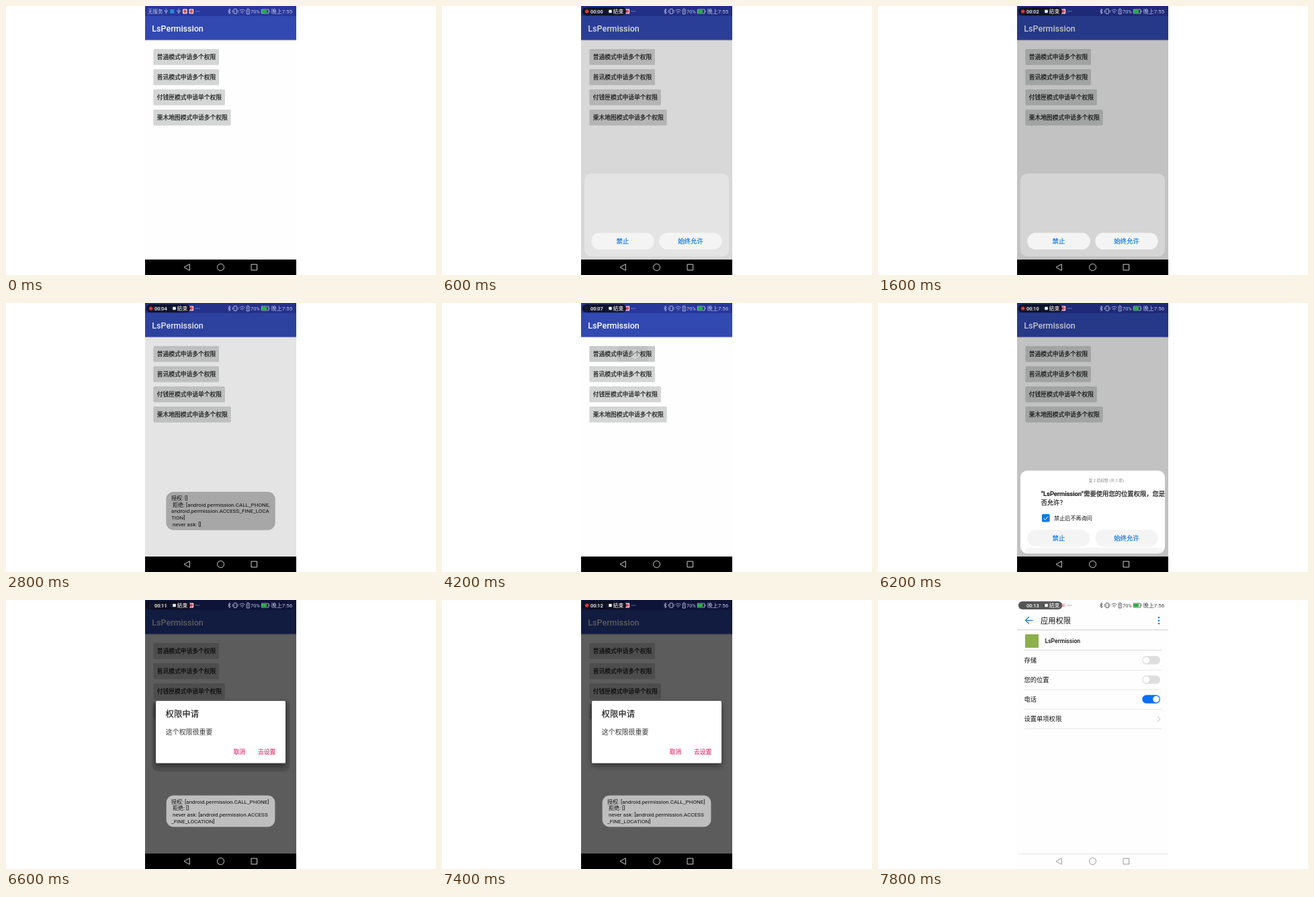
Recreate the animation shown at these times as an HTML page. Size 640 by 400 pixels, loop 8000 ms.

```html
<!DOCTYPE html>
<html lang="zh-CN">
<head>
<meta charset="utf-8">
<title>LsPermission</title>
<style>
  html, body { margin: 0; width: 100%; height: 100%; overflow: hidden; background: #fff; }
  svg { display: block; width: 640px; height: 400px; }
  text { font-family: Roboto, "Noto Sans CJK SC", "Noto Sans CJK", sans-serif; white-space: pre; }
  .medium { font-weight: 500; }
  /* The CJK font has no medium weight, so a hairline thickens it */
  .sturdy { stroke-width: 0.22; }
  .line { fill: none; stroke: currentColor; }
</style>
</head>
<body>
<svg viewBox="0 0 640 400">
  <defs>
    <filter id="soft" x="-10%" y="-20%" width="120%" height="150%">
      <feDropShadow dx="0" dy="0.5" stdDeviation="0.7" flood-opacity="0.22"/>
    </filter>
    <filter id="deep" x="-10%" y="-20%" width="120%" height="150%">
      <feDropShadow dx="0" dy="4" stdDeviation="4" flood-opacity="0.45"/>
    </filter>
    <clipPath id="firstButton"><rect x="219.5" y="64" width="97.5" height="23" rx="1.5"/></clipPath>
    <clipPath id="screen"><rect x="207" width="225" height="400"/></clipPath>
  </defs>

  <g clip-path="url(#screen)">
    <g id="home">
      <rect x="207" width="225" height="378" fill="#fefefe"/>
      <rect x="207" y="10" width="225" height="40.5" fill="#3249b1" filter="url(#soft)"/>
      <rect x="207" width="225" height="15" fill="#27379b"/>
      <text class="medium" x="217.3" y="38" font-size="12.5" fill="#fff">LsPermission</text>
      <g id="buttons"></g>
      <g id="press" clip-path="url(#firstButton)">
        <rect x="219" y="63" width="99" height="25" fill-opacity="0.05"/>
        <circle id="ripple" cx="284" cy="76" r="24" fill-opacity="0.05"/>
        <circle cx="287" cy="76" r="7" fill="#eee" fill-opacity="0.35"/>
      </g>
    </g>
    <rect id="dim" x="207" width="225" height="378"/>

    <g id="panel">
      <rect id="panelBack" x="212" y="249.2" width="215" height="123.3" rx="10" fill="#fff"/>
      <g id="panelBody">
        <text id="counter" x="339.7" y="266" font-size="5.8" text-anchor="middle" fill="#888"></text>
        <g class="medium sturdy" font-size="9.3" fill="#111" stroke="#111">
          <text id="question" x="242.5" y="287.3"></text>
          <text x="242.5" y="299.8">否允许？</text>
        </g>
        <g id="never">
          <rect x="244.2" y="314.3" width="11" height="11" rx="1.8" fill="#fff" stroke="#bbb" stroke-width="0.8"/>
          <g id="tick">
            <rect x="244" y="314" width="11.5" height="11.5" rx="1.8" fill="#0b7ae8"/>
            <path d="M246.5 320l2.3 2.4 4.4-5" fill="none" stroke="#fff"/>
          </g>
          <text x="262" y="323" font-size="8.15" fill="#111">禁止后不再询问</text>
          <rect x="219" y="364" width="204" height="8" rx="4" fill="#f5f5f5"/>
        </g>
      </g>
      <g fill="#f4f4f4">
        <rect x="222.3" y="337.3" width="93.5" height="24.7" rx="12.3"/>
        <rect x="323.2" y="337.3" width="93.5" height="24.7" rx="12.3"/>
      </g>
      <g class="sturdy" font-size="9.4" text-anchor="middle" fill="#0f7ae0" stroke="#0f7ae0">
        <text x="269" y="353.3">禁止</text>
        <text x="370" y="353.3">始终允许</text>
      </g>
    </g>

    <rect id="alertHalo" x="218" y="149" width="204" height="106" rx="8" fill-opacity="0.13"/>
    <g id="alert">
      <rect x="223" y="150" width="193" height="92.5" rx="1.5" fill="#fff" filter="url(#deep)"/>
      <text class="sturdy" x="237.6" y="174.4" font-size="12.4" fill="#222" stroke="#222">权限申请</text>
      <text x="237.8" y="199.7" font-size="9.95" fill="#333">这个权限很重要</text>
      <g class="sturdy" font-size="8.75" fill="#e8407a" stroke="#e8407a">
        <text x="338.7" y="229">取消</text>
        <text x="375" y="229">去设置</text>
      </g>
    </g>

    <g id="toast">
      <rect id="toastBack" x="238.5" width="162" rx="11" stroke="#000" stroke-opacity="0.12" stroke-width="0.6"/>
      <g id="toastText" font-size="8.08" fill="#111"></g>
    </g>

    <g id="settings">
      <rect x="207" width="225" height="400" fill="#fefefe"/>
      <g fill="none" stroke="#1677e0" stroke-width="1.2">
        <path d="M230.5 30.3H219.5M224.8 25l-5.4 5.3 5.4 5.3"/>
        <path d="M418 26v0M418 30.5v0M418 35v0" stroke-width="2.5" stroke-linecap="round"/>
      </g>
      <text x="242" y="34.7" font-size="11.25" fill="#111">应用权限</text>
      <path d="M207 44.5h225" stroke="#d0d0d0"/>
      <rect x="219" y="51" width="20" height="20" fill="#8bb04c"/>
      <text class="medium" x="248.5" y="63.7" font-size="8.6" fill="#111">LsPermission</text>
      <g id="rows" font-size="9.3" fill="#111"></g>
      <path d="M416 173l3.8 3.9-3.8 3.9" fill="none" stroke="#bbb"/>
    </g>

    <g id="status" fill="currentColor">
      <text x="211" y="10.7" font-size="7.5">无服务</text>
      <g class="line" stroke-width="0.8">
        <path id="usb" d="M238.3 4v8M236.3 6v2l2 1.6 2-1.6V6"/>
        <use href="#usb" x="18.7"/>
        <path d="M282 8h1.3m1 0h1.3m1 0h1.3"/>
        <path d="M330.3 6l4 4-2 2V4l2 2-4 4"/>
        <path d="M339.2 4.5h4v7h-4zM337.3 6v4M345 6v4"/>
        <path d="M347.5 7q4-3.6 8 0M349 9q2.5-2.3 5 0M350.6 10.6q.9-.8 1.8 0"/>
        <path d="M358.2 5h4v7h-4zM359.5 4h1.4M360.2 6.5v2.6m0 .8v1"/>
        <path d="M380.3 5h10.6v6h-10.6zM392 6.8v2.4"/>
      </g>
      <rect x="381" y="5.7" width="7" height="4.6" fill="#22b53a"/>
      <g id="badges">
        <rect x="244.3" y="5" width="6" height="6" fill="#2488dc"/>
        <g id="badge">
          <rect x="263" y="4.5" width="6.6" height="7" rx="1" fill="#f0dbe2"/>
          <circle cx="266.3" cy="8" r="2.4" fill="#dc4c5c"/>
        </g>
        <use href="#badge" x="9.6"/>
      </g>
      <text x="364" y="10.7" font-size="7.4">70%</text>
      <text id="clock" x="394.8" y="11" font-size="8"></text>
    </g>

    <g id="pill">
      <rect id="pillBack" x="208.8" y="2" width="65.5" height="12" rx="6" fill-opacity="0.88"/>
      <circle id="recordDot" cx="215.7" cy="8" r="2.6" fill="#f2362e"/>
      <rect x="248.3" y="5.8" width="4.4" height="4.4" fill="#fff"/>
      <g fill="#fff">
        <text class="medium" id="timer" x="221" y="10.7" font-size="7.4"></text>
        <text x="254.8" y="10.8" font-size="7.7">結束</text>
      </g>
    </g>

    <g id="nav">
      <rect id="navBack" x="207" y="377" width="225" height="23"/>
      <path id="navEdge" d="M207 377.5h225" stroke="#e6e6e6"/>
      <g class="line" stroke-width="1">
        <path d="M265 388.5l8.3-4.7v9.4z"/>
        <circle cx="319.5" cy="388.5" r="5"/>
        <path d="M365 384.2h8.6v8.6H365z"/>
      </g>
    </g>
  </g>
</svg>

<script>
const LOOP = 8000, STEP = 200;
const el = Object.fromEntries([...document.querySelectorAll('[id]')].map(e => [e.id, e]));

const labels = ['普通模式申请多个权限', '苔讯模式申请多个权限', '付钱匣模式申请单个权限', '栗木地图模式申请多个权限'];
el.buttons.innerHTML = labels.map((label, i) => `
  <rect x="219.5" y="${64 + 30 * i}" width="${label.length * 8.75 + 10}" height="23" rx="1.5" fill="#d4d5d5" filter="url(#soft)"/>
  <text class="sturdy" x="224.8" y="${78.9 + 30 * i}" font-size="8.75" fill="#1c1c1c" stroke="#1c1c1c">${label}</text>`).join('');

const toggle = (y, on) => `
  <rect x="393.3" y="${y - 6.3}" width="26.7" height="12.6" rx="6.3" fill="${on ? '#0a6efa' : '#dedede'}"/>
  <circle cx="${on ? 414 : 399.3}" cy="${y}" r="4.8" fill="#fff"/>`;
const rows = ['存储', '您的位置', '电话', '设置单项权限'];
el.rows.innerHTML = '<path d="M217.5 74.5h204.5" stroke="#dcdcdc"/>' + rows.map((name, i) => {
  const y = 89.5 + 29 * i;
  return `<text x="217.4" y="${y + 3.8}">${name}</text>
    <path d="M217.5 ${y + 15}h204.5" stroke="#e8e8e8"/>${i < 3 ? toggle(y, i === 2) : ''}`;
}).join('');

const toasts = [
  ['授权: []', ' 拒绝: [android.permission.CALL_PHONE,', 'android.permission.ACCESS_FINE_LOCA', 'TION]', ' never ask: []'],
  ['授权: [android.permission.CALL_PHONE]', ' 拒绝: []', ' never ask: [android.permission.ACCESS', '_FINE_LOCATION]']
];

// Linear interpolation through [time, value] pairs
function track(t, points) {
  const next = points.findIndex(p => p[0] > t);
  if (next === 0) return points[0][1];
  if (next < 0) return points.at(-1)[1];
  const [t0, v0] = points[next - 1], [t1, v1] = points[next];
  return v0 + (v1 - v0) * (t - t0) / (t1 - t0);
}
const within = (t, from, to) => t >= from && t < to;
const fade = (node, value) => {
  node.style.opacity = value;
  node.style.display = value > 0 ? '' : 'none';
};

function drawPanel(t, second) {
  const open = within(t, 600, 2700) || within(t, 4600, 6400);
  const solid = track(t, [[600, .3], [800, 1], [1400, 1], [1600, .3], [1800, 1], [4400, 0], [4600, .3], [4800, 1]]);
  const location = t >= (second ? 5200 : 1600);
  fade(el.panel, +open);
  el.panelBack.style.opacity = solid;
  fade(el.panelBody, +(solid > .5));
  fade(el.never, +second);
  fade(el.tick, +within(t, 5600, 6400));
  el.counter.textContent = `第 ${location ? 2 : 1} 项权限 (共 2 项)`;
  el.question.textContent = `“LsPermission”需要使用您的${location ? '位置' : '电话'}权限，您是`;
}

function drawToast(t, second) {
  const lines = toasts[+second], top = 337.5 - 8.6 - 9.6 * lines.length;
  fade(el.toast, track(t, [[2700, 0], [2750, 1], [3800, 1], [4000, 0], [6400, 0], [6600, 1], [7400, 1], [7600, 0]]));
  const gray = track(t, [[2800, 167], [3000, 190]]);
  el.toastBack.setAttribute('fill', `rgb(${gray},${gray},${gray})`);
  el.toastBack.setAttribute('y', top);
  el.toastBack.setAttribute('height', 337.5 - top);
  el.toastText.innerHTML = lines.map((line, i) =>
    `<text x="246" y="${top + 12.2 + 9.6 * i}">${line}</text>`).join('');
}

function draw(t) {
  const second = t >= 4000, inSettings = t >= 7600;
  const pressTime = t - (second ? 4200 : 200);

  fade(el.press, +within(pressTime, 0, 400));
  el.ripple.setAttribute('r', 24 + Math.max(0, pressTime) * .2);
  el.dim.style.opacity = track(t, [[400, 0], [600, .15], [800, .235], [2600, .235], [2800, .1], [3000, 0],
    [4400, 0], [4600, .15], [4800, .235], [6200, .235], [6400, .35], [6600, .635]]);
  drawPanel(t, second);
  drawToast(t, second);
  fade(el.alert, track(t, [[6200, 0], [6400, .4], [6600, 1]]));
  fade(el.alertHalo, +within(t, 6400, 6800));
  fade(el.settings, track(t, [[7400, 0], [7600, .85], [7800, 1]]));

  el.status.style.color = inSettings ? '#444' : '#c0c5e6';
  fade(el.badges, inSettings ? .4 : 1);
  el.clock.textContent = t < 3600 ? '晚上7:55' : '晚上7:56';
  const seconds = Math.max(0, Math.floor(t * .00183 - .62));
  fade(el.pill, +(t >= 200));
  fade(el.recordDot, +(seconds % 2 === 0));
  el.timer.textContent = '00:' + String(seconds).padStart(2, '0');
  el.pillBack.setAttribute('fill', inSettings ? '#444' : '#0c0e1c');

  el.nav.style.color = inSettings ? '#999' : '#d0d0d0';
  el.navBack.setAttribute('fill', inSettings ? '#fefefe' : '#000');
  fade(el.navEdge, +inSettings);
}

function frame() {
  draw(Math.floor(performance.now() % LOOP / STEP) * STEP);
  requestAnimationFrame(frame);
}
frame();
</script>
</body>
</html>
```
